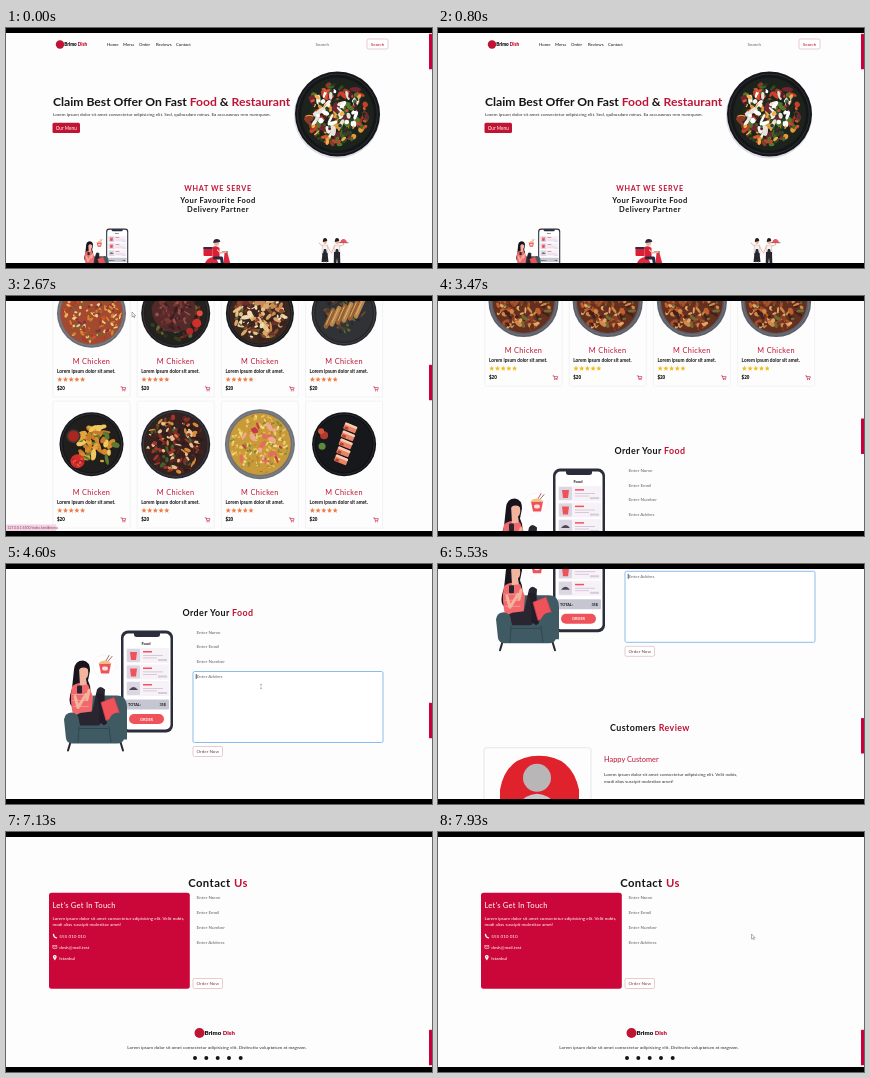
Recreate the animation shown at these times as an HTML page. Size 426 by 240 pixels, loop 8 s.

```html
<!DOCTYPE html>
<html lang="en">
<head>
<meta charset="utf-8">
<title>Food ordering page</title>
<style>
  html, body { margin: 0; width: 100%; height: 100%; overflow: hidden; background: #000; }
  svg { display: block; width: 100%; height: 100%; font-family: Lato, "Open Sans", sans-serif; }
</style>
</head>
<body>
<svg id="stage" viewBox="0 0 426 240" xmlns="http://www.w3.org/2000/svg"></svg>
<script>
const RED = '#c01435', INK = '#141414', GREY = '#666', CORAL = '#f0525a', TEAL = '#3f5a63', SKIN = '#f2b49c';
const LOOP = 8000, STEP = LOOP / 120;
const LOREM = 'Lorem ipsum dolor sit amet consectetur adipisicing elit.';

// Drawing helpers
const attrs = o => Object.entries(o).map(([k, v]) => ` ${k}="${v}"`).join('');
const text = (x, y, size, str, o = {}) =>
  `<text${attrs({ x, y, 'font-size': size, fill: INK, ...o })}>${str}</text>`;
const rect = (x, y, width, height, fill, rx = 0, o = {}) => `<rect${attrs({ x, y, width, height, fill, rx, ...o })}/>`;
const circle = (cx, cy, r, fill, o = {}) => `<circle${attrs({ cx, cy, r, fill, ...o })}/>`;
const path = (d, fill, o = {}) => `<path${attrs({ d, fill, ...o })}/>`;
const line = (d, stroke, w) =>
  path(d, 'none', { stroke, 'stroke-width': w, 'stroke-linecap': 'round', 'stroke-linejoin': 'round' });
const group = (transform, body) => `<g transform="${transform}">${body}</g>`;
const red = str => `<tspan fill="${RED}">${str}</tspan>`;
const mid = { 'text-anchor': 'middle' };
const bold = { 'font-weight': 700 };

function random(seed) {
  return () => (seed = (seed * 16807) % 2147483647) / 2147483647;
}

const heading = (y, first, second, size = 8.9, gap = 0.4) =>
  text(212, y + size * 0.36, size, `${first} ${red(second)}`, { ...mid, ...bold, 'letter-spacing': gap });

const outlineButton = (x, y, w, label, color) =>
  rect(x, y, w, 10, '#fff', 1.5, { stroke: '#dcaab0', 'stroke-width': 0.6 }) +
  text(x + w / 2, y + 6.6, 4.6, label, { ...mid, fill: color });

const logo = (x, y, r, size) =>
  circle(x, y, r, RED) +
  text(x + r, y + size * 0.3, size, `Brimo ${red('Dish')}`, { 'font-weight': 900 });

function stars(x, y, fill) {
  let d = '';
  for (let s = 0; s < 5; s++) {
    for (let i = 0; i < 10; i++) {
      const a = -Math.PI / 2 + i * Math.PI / 5, r = i % 2 ? 1.2 : 2.7;
      d += `${i ? 'L' : 'M'}${(x + 2.8 + s * 5.7 + r * Math.cos(a)).toFixed(2)} ${(y + r * Math.sin(a)).toFixed(2)}`;
    }
    d += 'Z';
  }
  return path(d, fill);
}

// Pieces of food scattered over a disc
function scatter(cx, cy, r, seed, colors, count, size) {
  const rnd = random(seed * 7919);
  let out = '';
  for (let i = 0; i < count; i++) {
    const a = rnd() * 6.283, d = Math.sqrt(rnd()) * r;
    const x = (cx + d * Math.cos(a)).toFixed(1), y = (cy + d * Math.sin(a)).toFixed(1);
    const rx = (size * (0.5 + rnd())).toFixed(1), ry = (size * (0.3 + rnd() * 0.5)).toFixed(1);
    out += `<ellipse${attrs({ cx: x, cy: y, rx, ry, fill: colors[i % colors.length],
      transform: `rotate(${Math.round(rnd() * 180)} ${x} ${y})` })}/>`;
  }
  return out;
}

const plate = (cx, cy, r, rim, base, spread) =>
  circle(cx, cy, r, rim) + circle(cx, cy, r * 0.94, 'none', { stroke: '#fff', 'stroke-opacity': 0.16, 'stroke-width': 0.7 }) +
  circle(cx, cy, r * spread, base);

// Each dish is drawn around 0,0
const bowl = (r, rim, base, spread, seed, colors, count = 130, size = 2.4) =>
  plate(0, 0, r, rim, base, spread) + scatter(0, 0, r * spread - size, seed, colors, count, size);

const curry = () => bowl(34.5, '#6d6c74', '#a2492f', 0.9, 1,
  ['#d9812f', '#a83a2a', '#e8b45a', '#7d3440', '#c9562f', '#efd08a', '#6a6a34'], 190, 2);

const steak = () => plate(0, 0, 34.5, '#1d1d21', '#24221f', 0.9) +
  scatter(0, 0, 27, 2, ['#33401f', '#4c2a22', '#2a2524', '#5b6a34', '#7a2a26'], 70, 3) +
  path('M-24-6Q-14-26 8-22 24-16 18 6 10 22-8 18-24 12-24-6Z', '#53292a') +
  scatter(-3, -2, 17, 12, ['#7a3a33', '#3a1d20', '#94504a', '#622c2b'], 60, 2.6) +
  circle(21, 10, 4.5, '#d02f2a') + circle(14, 18, 3.5, '#b8252a') + circle(24, 0, 3, '#e0503a');

const platter = () => plate(0, 0, 34, '#191a1e', '#3a271f', 0.9) +
  scatter(0, 0, 26, 3, ['#d9a868', '#8a4a2c', '#f0dcae', '#6d2f2a', '#c98a52', '#35231f', '#e7c486'], 120, 3.6) +
  scatter(0, 0, 26, 13, ['#8d2f3a', '#5c6a35', '#f3e8c8'], 40, 1.6);

function ribs() {
  let out = plate(0, 0, 32.5, '#25272b', '#303236', 0.88) +
    scatter(0, 0, 20, 4, ['#4a4036', '#5c6a35', '#7a4a2a', '#2a2522'], 50, 2.5);
  for (let i = 0; i < 6; i++)
    out += group(`translate(${-15 + i * 6} ${6 - i * 2}) rotate(24)`,
      rect(-2.300, -12, 4.6, 22, i % 2 ? '#b98548' : '#9a6234', 2) + line('M-.5-9v15', '#e0b878', 0.8));
  return out;
}

const wedges = () => plate(0, 0, 32, '#17181b', '#201f1e', 0.88) +
  scatter(5, 0, 19, 5, ['#e2a53c', '#c97a28', '#f0c860', '#5e7a32', '#d98a2c'], 56, 4) +
  circle(-18, -8, 7, '#3b3534') + circle(-18, -8, 5.5, '#a8281f') +
  circle(-14, 17, 7, '#d32f2a') + scatter(-14, 17, 5, 15, ['#e8604a', '#b0202a'], 14, 1.6);

const stirFry = () => bowl(34.5, '#24252a', '#35221f', 0.9, 6,
  ['#a5352a', '#3a2220', '#d98a3c', '#5a2620', '#46602d', '#e8c090', '#2a1d1e', '#82302c'], 190, 2.5);

const rice = () => bowl(35, '#707276', '#c99a3a', 0.88, 7,
  ['#e8c052', '#d49a35', '#f2dc8a', '#b8862e', '#e9cc6a', '#7f8a3a'], 210, 1.7) +
  scatter(0, 0, 24, 17, ['#e0705a', '#f0a890', '#c9384a'], 22, 3.4);

function sushi() {
  let out = plate(0, 0, 32, '#111215', '#17181b', 0.88);
  for (let i = 0; i < 5; i++)
    out += group(`translate(${-3.500 + i * 2.300} ${15.500 - i * 8}) rotate(22)`,
      rect(-6, -3.400, 13, 6.8, '#e88468', 1) + rect(-6, -3.400, 13, 2.4, '#f6cdb4', 1) + rect(-5, 0.5, 4, 2.5, '#c03c30', 1));
  return out + circle(-20, -9, 4, '#b03a30') + circle(-23, -13, 3, '#d9503c') + circle(-22, 2, 3.500, '#5f8a3c');
}

const chicken = () => bowl(35, '#5d5f68', '#633020', 0.88, 9,
  ['#a5512a', '#6a2e1e', '#d08a48', '#45201a', '#c4602c', '#8a3f24', '#e0a868', '#6e6a35'], 190, 2.8);

const salad = () => plate(0, 0, 42.500, '#14161a', '#1c221c', 0.86) +
  scatter(0, 0, 31, 11, ['#2f4a26', '#c8402a', '#e39a3a', '#1f2c1c', '#6e2630', '#55782f', '#8a3a28'], 110, 4) +
  scatter(0, 0, 28, 21, ['#f6f3ec', '#e8e2d8', '#ffffff'], 36, 3.7) +
  scatter(0, 0, 31, 31, ['#3f6b2c', '#d8532e', '#efb04a', '#4a1f2c', '#27401f'], 55, 2.4);

const column = i => 85.5 + i * 84.2;

function card(i, nameY, dish, starColor) {
  const x = column(i), left = x - 34.5, cartX = x + 29.5, y = nameY + 27.5;
  return rect(x - 38.500, nameY - 91, 77, 127, 'none', 1, { stroke: '#ebebef', 'stroke-width': 0.6 }) +
    group(`translate(${x} ${nameY - 48})`, dish()) +
    text(x, nameY + 2.7, 7.3, 'M Chicken', { ...mid, fill: RED, 'letter-spacing': 0.38 }) +
    text(left, nameY + 11.7, 4.75, 'Lorem ipsum dolor sit amet.', bold) +
    stars(left, nameY + 18.4, starColor) +
    text(left, nameY + 29.2, 4.5, '$20', { 'font-weight': 900 }) +
    line(`M${cartX} ${y - 1.8}h1l.6 2.8h2.6l.5-2h-3.4`, RED, 0.6) +
    circle(cartX + 1.9, y + 2, 0.5, RED) + circle(cartX + 3.8, y + 2, 0.5, RED);
}

// Illustrations
function phone() {
  let out = rect(0, 0, 52, 102, '#2b2c3c', 7) + rect(2.5, 3, 47, 96, '#fff', 5) +
    path('M13 2h26v2q0 2.5-3 2.5H16q-3 0-3-2.5Z', '#2b2c3c') +
    text(25, 14, 4, 'Food', { ...mid, ...bold });
  for (let i = 0; i < 3; i++) {
    const y = 17.5 + i * 16.5;
    out += rect(5, y, 43, 15, '#f7f1f8', 1) + rect(6, y + 1, 13, 13, '#dcd6e2', 1) +
      (i < 2 ? path(`M9 ${y + 4}h7l-1 8h-5Z`, CORAL) : path(`M8 ${y + 9}q4.5-6 9 0Z`, '#4a4754')) +
      rect(22, y + 3, 9, 1.5, CORAL) + rect(22, y + 7, 20, 0.8, '#cdbfd2') + rect(22, y + 9.5, 14, 0.8, '#cdbfd2') +
      rect(37, y + 11, 9, 2, '#d7cadd');
  }
  return out + rect(5, 69, 43, 10, '#c5c6d2', 1) + text(7, 75.5, 3.8, 'TOTAL:', bold) +
    text(45, 75.5, 3.8, '35$', { ...bold, 'text-anchor': 'end' }) +
    rect(8, 83.5, 35, 10, CORAL, 5) + text(25.5, 90, 3.8, 'ORDER', { ...mid, ...bold, fill: '#fff' });
}

const noodleBox = () =>
  path('M2 5q2-4 11-4t11 8-11 11q-4 0-6 4l-1-4q-6-2-4-15Z', '#fff', { stroke: '#f3ecf2', 'stroke-width': 0.5 }) +
  line('M13 8l4-7M15 8l5-6', '#8f4b3d', 0.8) +
  path('M7 9h12l-2 10H9Z', CORAL) + path('M6 9q6-6 14 0Z', '#f3c27d') + rect(10, 12, 6, 4, '#fbe1dc', 2);

const armchair = () =>
  line('M8 80l-3 10M57 80l3 10', '#2b2530', 2) +
  path('M18 44q4-9 14-9h20q12-1 12 12v32H14Z', TEAL) +
  path('M11 9q1-9 9-9 7 1 7 10l-2 10q5 10 0 20l-16 6q-5-4 0-18Z', '#17141d') +
  path('M9 26q6-6 16-2l5 12-2 22H11q-5-18-2-32Z', '#f3686c') +
  line('M10 34h12M10 40h14M11 46h14', '#f9a3a0', 0.8) +
  path('M16 7q6-3 9 2 1 7-2 9l1 6-7 1Z', SKIN) +
  path('M13 14q-3-12 6-12 8 0 6 6-5-2-8 0Z', '#17141d') +
  path('M12 60q0-8 9-8l8-1 5-22q3-5 8 0l-2 30q-2 8-12 8H14Z', '#292632') +
  path('M33 33q5 12 3 28l5 4 3-2-3-30Z', '#211e29') +
  line('M12 36l3 11 8-13M26 30l-2 9', SKIN, 3) + rect(14, 25, 5, 8, '#292632', 1) +
  path('M38 42l13-5 6 17-14 6Z', CORAL, { stroke: '#d8404e', 'stroke-width': 0.7 }) +
  path('M1 59q1-7 8-7 7 1 7 8l1 5h28q1-13 11-13 9 1 8 11l-3 15q-1 5-7 5H10q-6 0-7-5Z', TEAL) +
  line('M16 66l-1 16M46 66l2 16M16 68h29', '#2f454e', 0.9);

const foodOrder = () =>
  group('translate(58 0)', phone()) + group('translate(0 30)', armchair()) + group('translate(29 24)', noodleBox());

function scooter() {
  return circle(7, 30, 3.8, '#2a2730') + circle(24, 30, 3.8, '#2a2730') +
    circle(7, 30, 1.6, '#ddd') + circle(24, 30, 1.6, '#ddd') +
    rect(0, 8, 9, 9, '#d81f35', 1) + rect(0, 8, 9, 2, '#2a2f45') +
    path('M1 25q3-8 11-7l3 6h5l1-10h3l4 15H2Z', '#e2283c') + line('M19 13h5', '#2a2730', 1) +
    path('M9 8q4-2 7 1v10H9Z', '#d81f35') + line('M11 19h7l1 7', '#252b3e', 3) +
    line('M14 11l3 3 5-1', SKIN, 1.4) + circle(13, 4.5, 2.5, SKIN) + path('M9.700 4q0-4 3.500-4t3.500 3Z', '#252b3e');
}

function waiters() {
  const person = (x, hem) =>
    circle(x, 4, 1.9, SKIN) + path(`M${x - 2.2} 4q0-4 2.2-4t2.2 3Z`, '#241c22') +
    path(`M${x - 2.5} 7h5l.5 9h-6Z`, '#f4f1f1', { stroke: '#888', 'stroke-width': 0.3 }) +
    path(`M${x - 1} 11h2l1.500 6h-5Z`, '#2c2a33') + hem;
  return person(8, path('M5.500 15h5l1 9h-7Z', '#26242c') + line('M7 24v9M9.500 24v9', SKIN, 0.9)) +
    person(20, path('M17 14h6l.5 19h-2l-1.500-13-1.500 13h-2Z', '#26242c')) +
    line('M5.500 8L2 5M10.500 8l3 6M17.500 8l-3 7M22.500 8l4-1v-2', SKIN, 1) +
    path('M23 4.500h7q-1-3.500-3.500-3.500T23 4.500Z', CORAL) + line('M22 4.700h9', '#7c3136', 0.7);
}

const form = (x, top, labels, size = 4.6) =>
  labels.map((s, i) => text(x, top + i * 14.8 + 1.6, size, s, { fill: GREY })).join('');

// Page sections, laid out in scroll coordinates
function hero() {
  const nav = [[101, 'Home'], [117, 'Menu'], [133, 'Order'], [150, 'Reviews'], [170, 'Contact']];
  return logo(54, 16.5, 4.2, 4.6) +
    nav.map(([x, s]) => text(x, 17.5, 4.3, s)).join('') +
    text(309.5, 17.5, 4.6, 'Search', { fill: GREY }) + outlineButton(361, 11, 21, 'Search', RED) +
    text(47, 77.5, 12.15, `Claim Best Offer On Fast ${red('Food')} &amp; ${red('Restaurant')}`, bold) +
    text(47, 88.2, 4.6, `${LOREM} Sed, quibusdam minus. Ea accusamus rem numquam.`, { fill: '#333' }) +
    rect(46.5, 94.8, 27.5, 10.2, RED, 1.5) + text(60.2, 101.5, 4.7, 'Our Menu', { ...mid, fill: '#fff' }) +
    circle(331, 87.3, 43.2, '#dfe1e6') + group('translate(331.5 86)', salad());
}

function services() {
  const list = [[99.5, 'Easy To Order'], [212, 'Fastest Delivery'], [324, 'Best Quality']];
  return text(212, 162.8, 7.2, 'WHAT WE SERVE', { ...mid, ...bold, fill: RED, 'letter-spacing': 0.7 }) +
    ['Your Favourite Food', 'Delivery Partner'].map((s, i) =>
      text(212, 174.5 + i * 9.3, 7.5, s, { ...mid, ...bold, 'letter-spacing': 0.45 })).join('') +
    group('translate(75.500 200.500) scale(.425)', foodOrder()) +
    group('translate(197.500 211)', scooter()) +
    group('translate(311 210)', waiters()) +
    list.map(([x, s]) => text(x, 261.8, 6.6, s, { ...mid, 'letter-spacing': 0.25 }) +
      text(x, 271.5, 4.6, 'Lorem ipsum dolor sit amet', { ...mid, fill: GREY }) +
      text(x, 278, 4.6, 'consectetur adipisicing.', { ...mid, fill: GREY })).join('');
}

function menu() {
  const dishes = [curry, steak, platter, ribs, wedges, stirFry, rice, sushi];
  return heading(360, 'Our', 'Menu') +
    dishes.map((dish, i) => card(i % 4, i < 4 ? 477 : 608, dish, '#ee7f48')).join('') +
    heading(700, 'Our', 'Gallery') +
    [0, 1, 2, 3].map(i => card(i, 817, chicken, '#f2bd22')).join('');
}

function order() {
  const y = 918;
  return heading(y, 'Order Your', 'Food') +
    group(`translate(57 ${y + 17.5})`, foodOrder()) +
    `<g id="focus">${rect(187, y + 58.5, 190, 71, '#fff', 1.5, { stroke: '#8bbcf0', 'stroke-width': 1 })}</g>` +
    form(190.5, y + 19, ['Enter Name', 'Enter Email', 'Enter Number', 'Enter Addres']) +
    `<g id="caret">${rect(189.8, y + 61, 0.7, 5, INK)}</g>` +
    outlineButton(187, y + 133.5, 29.5, 'Order Now', '#6a4a52');
}

function reviews() {
  const y = 1133;
  return heading(y, 'Customers', 'Review') +
    rect(46, y + 20, 107, 92, '#fdfdfd', 2, { stroke: '#dcdcdc', 'stroke-width': 0.7 }) +
    path(`M62 ${y + 112}V${y + 62}q6-34 39-34t40 34v50Z`, '#e0222c') +
    circle(99, y + 50, 14, '#b9b6b8') +
    path(`M76 ${y + 112}q-4-44 23-46 27 2 24 46Z`, '#c9c7ca') +
    line(`M46 ${y + 112}h107`, '#b9a4a4', 0.7) +
    text(166, y + 34, 7.4, 'Happy Customer', { fill: RED }) +
    text(166, y + 48, 4.6, `${LOREM} Velit nobis,`, { fill: '#333' }) +
    text(166, y + 55, 4.6, 'modi alias suscipit molestiae amet!', { fill: '#333' }) +
    stars(166, y + 97, '#f2bd22');
}

function contact() {
  const y = 1306, white = { fill: '#fff' };
  return heading(y, 'Contact', 'Us', 11.3, 0.4) +
    rect(43, y + 10.3, 140.8, 96, '#cb0639', 2.5) +
    text(46.5, y + 25.3, 7.6, 'Let\'s Get In Touch', { ...white, 'letter-spacing': 0.22 }) +
    text(46.5, y + 37, 4.55, `${LOREM} Velit nobis,`, white) +
    text(46.5, y + 43.8, 4.55, 'modi alias suscipit molestiae amet!', white) +
    ['555 010 010', 'desk@mail.test', 'Istanbul'].map((s, i) =>
      text(53.3, y + 55.2 + i * 11, 4.6, s, white)).join('') +
    line(`M47.5 ${y + 52}q.3 3 3 3.3`, '#fff', 1.3) +
    rect(46.8, y + 63, 4, 3, 'none', 0.3, { stroke: '#fff', 'stroke-width': 0.5 }) +
    line(`M46.8 ${y + 63.2}l2 1.5 2-1.5`, '#fff', 0.5) +
    path(`M48.8 ${y + 78}l-1.7-2.8a1.9 1.9 0 1 1 3.4 0Z`, '#fff') + circle(48.8, y + 74.3, 0.6, '#cb0639') +
    form(190.5, y + 15, ['Enter Name', 'Enter Email', 'Enter Number', 'Enter Address']) +
    outlineButton(187, y + 96, 29.5, 'Order Now', '#8a4558') +
    logo(193.5, y + 150.5, 5, 6.1) +
    text(211, y + 166.8, 4.6, `${LOREM} Distinctio voluptatum at magnam.`, { ...mid, fill: '#333' }) +
    [189, 200.3, 211.7, 223, 234.7].map(x => circle(x, y + 175.5, 2, '#151515')).join('');
}

const stage = document.getElementById('stage');
stage.innerHTML =
  rect(0, 0, 426, 240, '#fdfdfd') +
  `<g id="page">${hero()}${services()}${menu()}${order()}${reviews()}${contact()}</g>` +
  `<g id="status">${rect(0, 228.5, 50.5, 6.5, '#f3d3e2', 1)}${text(1.5, 233, 3.4, '127.0.0.1:5500/index.html#menu', { fill: '#8b3f73' })}</g>` +
  `<g id="thumb">${rect(423, 0, 3, 35.5, '#c8003c', 0.5)}</g>` +
  `<g id="arrow">${path('M0 0l0 5 1.2-1 .8 1.8.8-.4-.8-1.7h1.6Z', '#fff', { stroke: '#666', 'stroke-width': 0.5 })}</g>` +
  `<g id="beam">${line('M-.6-2.100h1.2M0-2.100v4.200M-.6 2.100h1.2', '#777', 0.4)}</g>` +
  rect(0, 0, 426, 5, '#000') + rect(0, 235, 426, 5, '#000');

const el = id => document.getElementById(id);
const page = el('page'), thumb = el('thumb'), arrow = el('arrow'), beam = el('beam');
const focus = el('focus'), caret = el('caret'), statusBar = el('status');
const move = (node, x, y) => node.setAttribute('transform', `translate(${x.toFixed(2)} ${y.toFixed(2)})`);
const show = (node, on) => node.setAttribute('visibility', on ? 'visible' : 'hidden');

// Scroll position over time, joined by a monotone cubic
const END = 1255.5;
const scrollKeys = [[0, 0], [1330, 0], [1533, 34.5], [2667, 412], [3467, 763], [3870, 869],
  [4100, 869], [5000, 869], [6400, 1224], [6800, END], [LOOP, END]];
const slopes = scrollKeys.slice(1).map(([t, y], i) => (y - scrollKeys[i][1]) / (t - scrollKeys[i][0]));
const tangent = i => {
  const a = slopes[i - 1] || 0, b = slopes[i] || 0;
  return a * b > 0 ? 2 * a * b / (a + b) : 0;
};

function scrollAt(t) {
  let i = 0;
  while (i < slopes.length - 1 && t >= scrollKeys[i + 1][0]) i++;
  const [t0, y0] = scrollKeys[i], [t1, y1] = scrollKeys[i + 1];
  const h = t1 - t0, u = (t - t0) / h, v = 1 - u;
  return y0 * v * v * (1 + 2 * u) + y1 * u * u * (3 - 2 * u) + h * u * v * (v * tangent(i) - u * tangent(i + 1));
}

// Pointer stays: from, to, x, y
const stays = [[1250, 1800, 420, 34], [2250, 3050, 126, 16], [7200, LOOP, 313.5, 102]];

function draw(time) {
  const t = Math.floor(((time + 5) % LOOP) / STEP) * STEP;
  const y = scrollAt(t);
  move(page, 0, -y);
  move(thumb, 0, 5.8 + y / END * 192);
  const stay = stays.find(([from, to]) => t >= from && t < to);
  show(arrow, stay);
  if (stay) move(arrow, stay[2], stay[3]);
  const typing = t >= 4300 && t < 5900;
  show(focus, typing);
  show(caret, typing && (t - 4300) % 1000 < 500);
  show(beam, t >= 4100 && t < 5000);
  move(beam, 255, 122.5);
  show(statusBar, t >= 2300 && t < 3050);
}

const start = performance.now();
function tick() {
  draw(performance.now() - start);
  requestAnimationFrame(tick);
}
draw(0);
tick();
</script>
</body>
</html>
```
